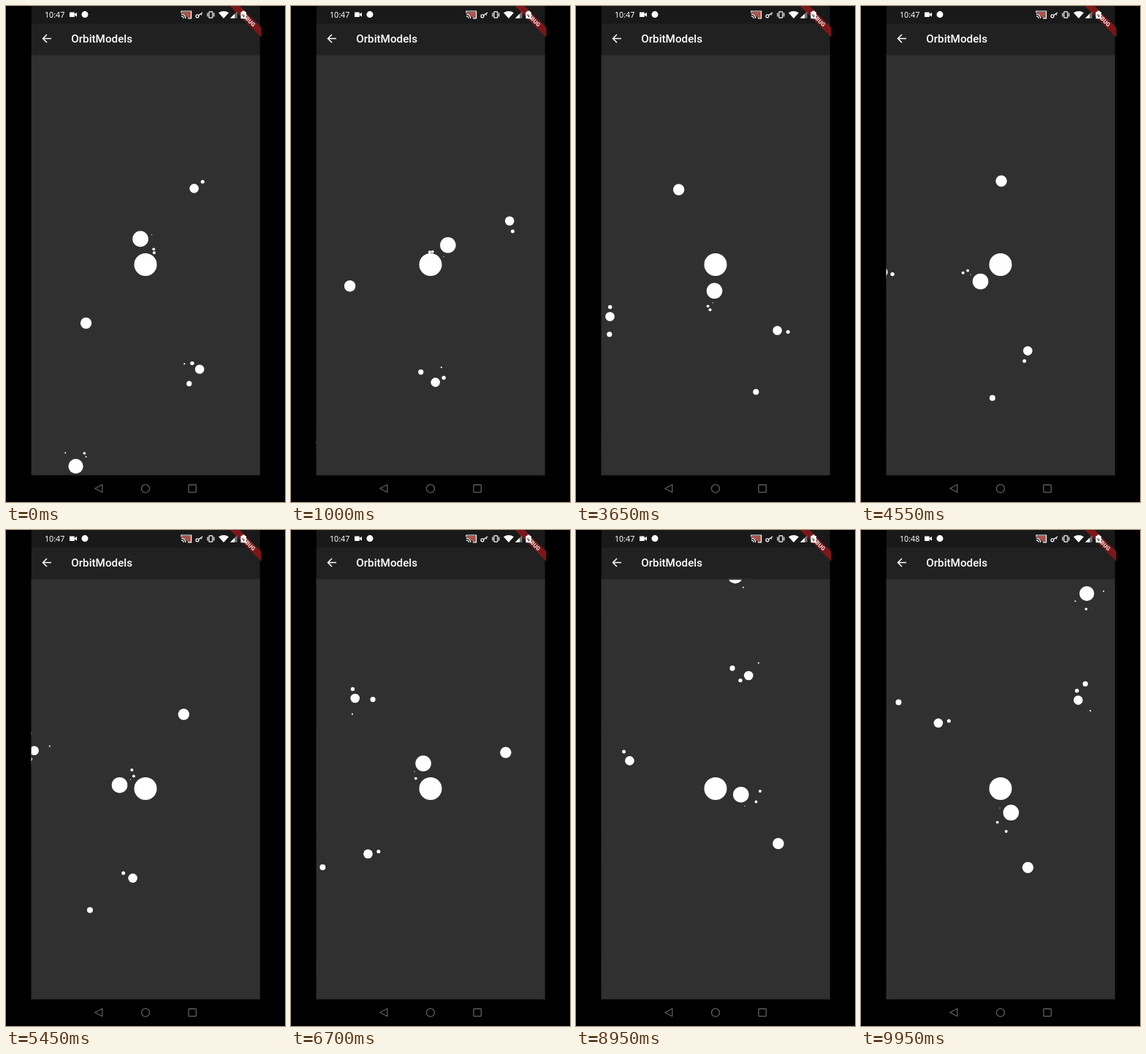
Write an HTML page with a canvas that moves like this. It is 382x678 px and loops after 10000 ms.

```html
<!DOCTYPE html>
<html lang="en">
<head>
<meta charset="utf-8">
<title>Orbits</title>
<style>
  html, body { margin: 0; width: 100%; height: 100%; overflow: hidden; background: #000; }
  canvas, svg { position: absolute; left: 0; top: 0; width: 382px; height: 678px; display: block; }
  .clock { font: 10.7px "Noto Sans", sans-serif; fill: #fff; }
  .title { font: 500 15.2px Roboto, sans-serif; fill: #fff; }
  .debug { font: 900 7.7px Roboto, sans-serif; fill: #e4dede; text-anchor: middle; }
</style>
</head>
<body>
<canvas id="sky" width="382" height="678"></canvas>
<svg viewBox="0 0 382 678">
  <defs>
    <clipPath id="screen"><rect x="34" width="315.5" height="641"/></clipPath>
  </defs>

  <!-- status bar, app bar and banner -->
  <rect x="34.8" width="312.9" height="24" fill="#191919"/>
  <rect x="34.8" y="24" width="312.9" height="42.5" fill="#212121"/>
  <rect x="34.8" y="66.5" width="312.9" height="1.5" fill="#292929"/>
  <g clip-path="url(#screen)">
    <g transform="translate(349.5 0) rotate(45)">
      <rect x="-40" y="20.9" width="80" height="9.4" fill="#7c1618"/>
      <text class="debug" y="28.3">DEBUG</text>
    </g>
  </g>
  <text class="clock" id="clock" x="53" y="15.8">10:47</text>
  <text class="title" x="89.3" y="50.3">OrbitModels</text>

  <!-- status icons -->
  <g fill="#fff">
    <rect x="87" y="8.4" width="6.8" height="6.6" rx=".6"/>
    <path d="M93 11.7l4-3v6z"/>
    <circle cx="108" cy="11.6" r="4.5"/>
    <path d="M291 9.3q7-4.6 14 0l-7 7.7z"/>
    <path d="M307 16.8h9.5V7.2z" fill="#777"/>
    <path d="M307 16.8h6v-6z"/>
    <rect x="321.5" y="8" width="7.4" height="9.2" rx=".6"/>
    <rect x="323.5" y="6.6" width="3.4" height="2"/>
    <path d="M326 9l-3 4h4l-2.2 3v-5z" fill="#191919"/>
  </g>
  <path fill="#a8544c" d="M241 8h12v8h-4l-8-6z"/>
  <g fill="none" stroke="#fff" stroke-width="1.2">
    <path d="M240 9.5V7h13.6v9.8H249M240 11.2a5.6 5.6 0 0 1 5.8 5.8M240 13.8a3 3 0 0 1 3.2 3.2"/>
    <circle cx="262" cy="13.8" r="2"/>
    <path d="M263.6 12.7l5.6-3.8M266.8 10.7l1.1 1.8"/>
    <rect x="278" y="7.8" width="4.8" height="8.4" rx=".8"/>
    <path d="M276 9.6v4.8M284.8 9.6v4.8"/>
    <path d="M62 44.5H51M56 39l-5.5 5.5L56 50" stroke-width="1.5"/>
  </g>

  <!-- navigation bar -->
  <g fill="none" stroke="#606060" stroke-width="1.3" stroke-linejoin="round">
    <path d="M121.8 659.5l10-5.3v10.6z"/>
    <circle cx="191" cy="659.7" r="5.5"/>
    <rect x="250" y="654.5" width="10.4" height="10.2" rx="1"/>
  </g>
</svg>
<script>
  const LOOP = 10000, STEP = 50;
  const LEAD = 20;       // keeps each step ready when its display frame begins
  const PULL = 317.2;    // degrees per second at a radius of one pixel
  const TURN = Math.PI / 180;

  // The orbit radius alone sets the speed; moons also turn with their planet.
  const body = (radius, phase, size, ...moons) =>
    ({ radius, phase, size, moons, speed: PULL / Math.sqrt(radius) });

  const sun = body(0, 0, 15.5,
    body(35.8, -101.2, 10.8,
      body(26.6, 45, 2), body(22.9, 37.5, 1.9), body(16.6, -20, 0.6)),
    body(114.2, 135.5, 7.7),
    body(123.6, -57.4, 6.3,
      body(14.7, -38, 2.5)),
    body(161, 62.6, 6.3,
      body(24.4, 126, 3.6), body(13, 218.5, 2.7), body(22, 199.3, 1.1)),
    body(182.7, -13.3, 4),
    body(291.7, 109.1, 10.1,
      body(23.2, 232.1, 1), body(21.3, -56.3, 1.8), body(19, -42.5, 1)));

  const ctx = document.getElementById('sky').getContext('2d');
  const clock = document.getElementById('clock');

  function draw({ size, moons }, x, y, spin, t) {
    ctx.beginPath();
    ctx.arc(x, y, size, 0, 2 * Math.PI);
    ctx.fill();
    for (const moon of moons) {
      const rate = spin + moon.speed;
      const angle = (moon.phase + rate * t) * TURN;
      draw(moon, x + moon.radius * Math.cos(angle), y + moon.radius * Math.sin(angle), rate, t);
    }
  }

  ctx.beginPath();
  ctx.rect(34.8, 66.5, 312.9, 574.8);
  ctx.clip();

  function frame() {
    const ms = Math.floor((performance.now() + LEAD) / STEP) * STEP % LOOP;
    ctx.clearRect(0, 0, 382, 678);
    ctx.fillStyle = '#303030';
    ctx.fillRect(0, 0, 382, 678);
    ctx.fillStyle = '#fff';
    draw(sun, 191, 353.5, 0, ms / 1000);
    clock.textContent = ms < 9000 ? '10:47' : '10:48';
    requestAnimationFrame(frame);
  }
  frame();
</script>
</body>
</html>
```
